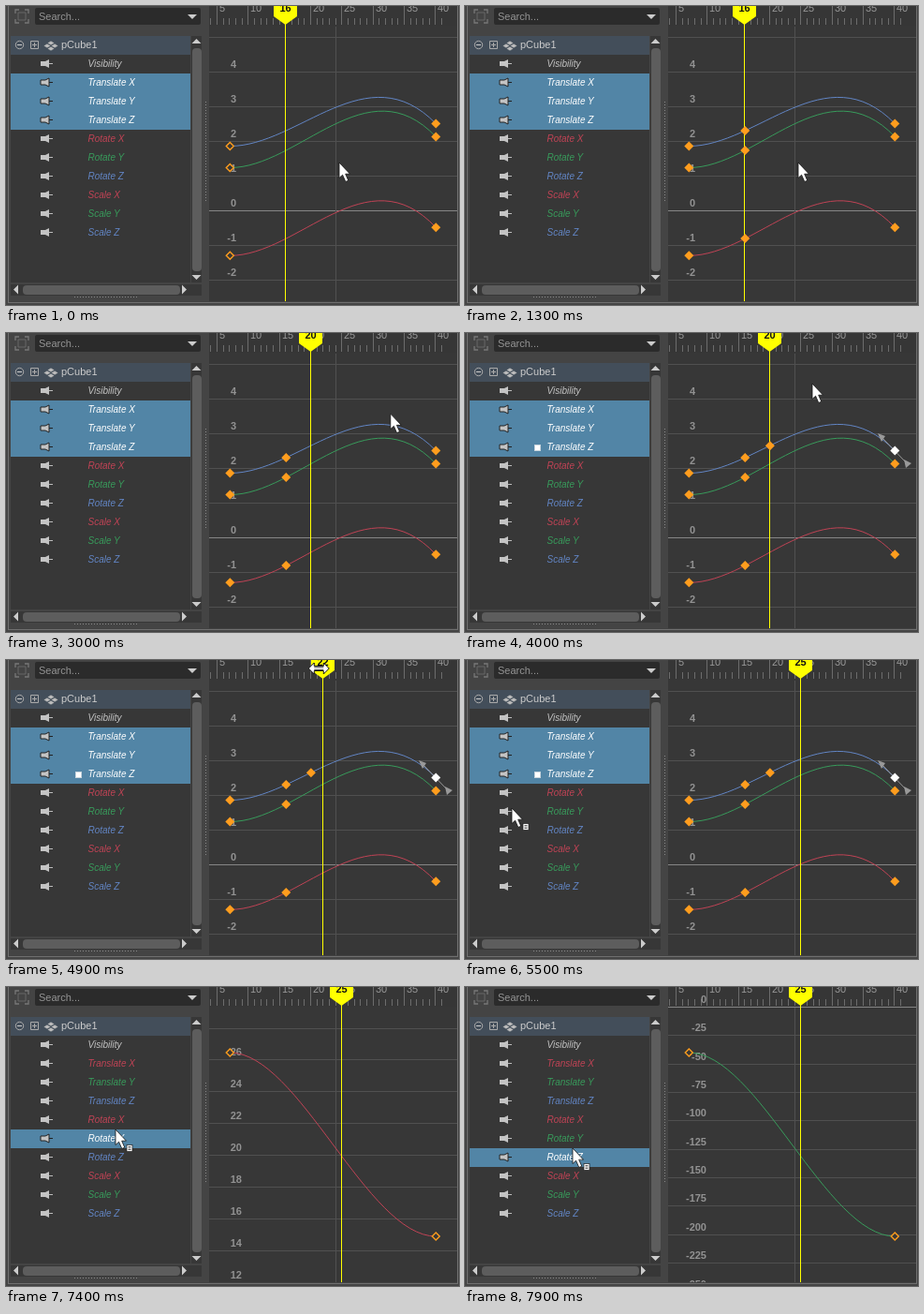
Animation of 484x319 px, one loop 8000 ms. Source, as an HTML page:

```html
<!DOCTYPE html>
<html lang="en">
<head>
<meta charset="utf-8">
<title>Graph editor</title>
<style>
  html, body { margin: 0; width: 100%; height: 100%; overflow: hidden; background: #444; }
  svg { display: block; font-family: "Liberation Sans", Arial, sans-serif; }
</style>
</head>
<body>
<svg id="stage" width="484" height="319" viewBox="0 0 484 319"></svg>
<script>
const LOOP = 8000, STEP = 100;
const RED = '#c04355', GREEN = '#389b5b', BLUE = '#6285c4', ORANGE = '#ff9d1e', YELLOW = '#ffff00';
const AXIS_COLORS = { X: RED, Y: GREEN, Z: BLUE };
const CHANNELS = ['Visibility', ...['Translate', 'Rotate', 'Scale'].flatMap(n => ['X', 'Y', 'Z'].map(a => n + ' ' + a))];
const START_X = 239.3, END_X = 459.3;

// Cursor moves: start time, number of steps, destination, cursor shape on arrival
const MOVES = [
  [1500, 5, 292, 9, 'resize'], [2200, 1, 296, 9, 'resize'], [2300, 4, 322, 9, 'resize'],
  [2800, 5, 459, 128, 'arrow'], [3500, 3, 371, 54, 'arrow'], [4300, 4, 326, 9, 'resize'],
  [4900, 3, 358, 9, 'resize'], [5300, 1, 270, 52, 'arrow'], [5400, 1, 140, 118, 'menu'],
  [5500, 1, 50, 158, 'menu'], [5600, 1, 24, 159, 'menu'], [5700, 1, 25, 155, 'menu'],
  [5800, 1, 68, 138, 'menu'], [5900, 1, 109, 127, 'menu'], [6100, 2, 115, 140, 'menu'],
  [7000, 2, 117, 152, 'menu'], [7600, 2, 115, 172, 'menu']
];

// Each curve: start height, second control height, end height, colour
const GRAPHS = {
  translate: {
    top: 33.3, gap: 37.05, first: 5, step: -1, count: 8, right: 246, skip: 1,
    curves: [[149.5, 50.5, 125.5, BLUE], [172.5, 62.5, 139.5, GREEN], [266.3, 157.8, 236.3, RED]]
  },
  rotateX: {
    top: 44, gap: 33.9, first: 28, step: -2, count: 9, right: 252, skip: 1,
    curves: [[70, 266, 266, RED]]
  },
  rotateY: {
    top: 21.2, gap: 30.4, first: 0, step: -25, count: 11, right: 258, skip: 0,
    curves: [[70, 266, 266, GREEN]]
  }
};

const rect = (x, y, w, h, fill, extra = '') => `<rect x="${x}" y="${y}" width="${w}" height="${h}" fill="${fill}" ${extra}/>`;
const path = (d, fill, stroke = 'none', width = 1) => `<path d="${d}" fill="${fill}" stroke="${stroke}" stroke-width="${width}"/>`;
const line = (x1, y1, x2, y2, stroke, extra = '') => `<path d="M${x1} ${y1}L${x2} ${y2}" stroke="${stroke}" ${extra}/>`;
const text = (x, y, s, fill, size = 11, extra = '') => `<text x="${x}" y="${y}" font-size="${size}" fill="${fill}" ${extra}>${s}</text>`;
const frameX = f => 192.2 + 6.665 * f;
const pixel = v => Math.floor(v) + 0.5;
const repeat = (n, draw) => Array.from({ length: n }, (_, i) => draw(i)).join('');

function cursorAt(t) {
  let x = 356, y = 167, kind = 'arrow';
  for (const [start, n, toX, toY, shape] of MOVES) {
    if (t < start) break;
    const k = Math.min(1, (Math.floor((t - start) / STEP) + 1) / n);
    const e = k * k * (3 - 2 * k);
    x += (toX - x) * e;
    y += (toY - y) * e;
    if (k === 1) kind = shape;
    else if (shape !== kind) kind = 'arrow';
    if (k < 1) break;
  }
  return { x, y, kind };
}

function playheadAt(t) {
  if (t < 2300) return 16;
  if (t < 4900) return Math.min(20, 17 + Math.floor((t - 2300) / STEP));
  return [22, 24, 25][Math.min(2, Math.floor((t - 4900) / STEP))];
}

function selectedRows(t) {
  if (t < 6400) return [1, 2, 3];
  return [t < 7400 ? 4 : t < 7900 ? 5 : 6];
}

function curveY([y0, y2, y3], x) {
  const u = (x - START_X) / (END_X - START_X), v = 1 - u;
  return y0 * (v ** 3 + 3 * v * v * u) + 3 * y2 * v * u * u + y3 * u ** 3;
}

function diamond(x, y, fill = ORANGE, hollow = false) {
  const r = hollow ? 4 : 5;
  return path(`M${x} ${y - r}l${r} ${r}l${-r} ${r}l${-r} ${-r}z`, hollow ? '#373737' : fill, hollow ? fill : 'none', 1.4);
}

function drawFrame() {
  const bracket = (x, y, sx, sy) => path(`M${x} ${y + 4 * sy}v${-4 * sy}h${4 * sx}`, 'none', '#777', 1.3);
  return rect(0, 0, 484, 319, '#444')
    + line(2.5, 0, 2.5, 316, '#707070') + line(2, 316.5, 482, 316.5, '#707070') + line(482.5, 0, 482.5, 317, '#707070')
    + bracket(10, 4, 1, 1) + bracket(24, 4, -1, 1) + bracket(10, 18, 1, -1) + bracket(24, 18, -1, -1)
    + path('M13 7h8v8h-8z', 'none', '#666')
    + rect(31, 2, 177, 18, '#2b2b2b', 'rx="2"') + text(35, 15, 'Search...', '#939393')
    + path('M194 9h10l-5 5z', '#ccc')
    + rect(5, 32, 192, 263, '#373737') + rect(198, 32, 11, 263, '#373737') + rect(5, 297, 204, 12, '#373737')
    + rect(199, 45, 10, 238, '#5d5d5d', 'rx="4"') + rect(18, 298, 168, 10, '#5d5d5d', 'rx="4"')
    + path('M198.5 40h10l-5-5zM198.5 287h10l-5 5zM13 297.5v10l-5-5zM188 297.5v10l5-5z', '#ccc')
    + line(73, 310.5, 140, 310.5, '#888', 'stroke-dasharray="1 2"')
    + line(213.5, 102, 213.5, 208, '#888', 'stroke-dasharray="1 2"');
}

function drawOutliner(t) {
  const chosen = selectedRows(t);
  const header = rect(5, 32, 192, 20, '#434e5a')
    + `<circle cx="14.5" cy="41.5" r="4.2" fill="none" stroke="#aaa"/>` + line(12, 41.5, 17, 41.5, '#ccc')
    + path('M26.5 37.5h8v8h-8zM28 41.5h5M30.5 39v5', 'none', '#aaa')
    + path('M48 37l4 2.5l-4 2.5l-4-2.5zM44 40l4 2.5l-4 2.5l-4-2.5zM52 40l4 2.5l-4 2.5l-4-2.5zM48 43l4 2.5l-4 2.5l-4-2.5z', '#bbb', '#434e5a', 0.7)
    + text(59, 45, 'pCube1', '#ccc');
  return header + CHANNELS.map((name, i) => {
    const y = 62 + 20 * i, on = chosen.includes(i);
    const color = on ? '#fff' : AXIS_COLORS[name.slice(-1)] || '#c4c4c4';
    const tagged = i === 3 && t >= 3400 && t < 6600;
    return (on ? rect(5, y - 10, 192, 20, '#5285a6') : '')
      + line(45, y - 0.5, 50, y - 0.5, on ? '#222' : '#bbb')
      + path(`M37 ${y - 3}h5l4-2v9l-4-2h-5z`, '#c4c4c4', on ? '#222' : 'none')
      + (tagged ? rect(74.5, y - 2.5, 6, 6, on ? '#fff' : '#5285c4', 'stroke="#c8d4dc"') : '')
      + text(87.5, y + 3, name, color, 10, 'font-style="italic"');
  }).join('');
}

function drawRuler() {
  return rect(217, 0, 265, 21, '#363636')
    + repeat(38, i => {
      const f = i + 4, x = pixel(frameX(f));
      if (x > 481) return '';
      const major = f % 5 === 0;
      return line(x, major ? 0 : 13, x, 20, '#6c6c6c') + (major ? text(x + 2.5, 6, f, '#999') : '');
    });
}

function drawKeys(t, curves, translate) {
  if (!translate) return curves.map(([y0, , y3]) => diamond(START_X, y0, ORANGE, true) + diamond(END_X, y3, ORANGE, true)).join('');
  const picked = t >= 3400;
  const handles = picked
    ? line(445, 111, 472, 139, '#999') + path('M441 107l8 3l-4 6zM477 139l-8-4l2 9z', '#999')
    : '';
  const added = (c, f) => diamond(frameX(f) + 0.4, curveY(c, frameX(f) + 0.4));
  return handles + curves.map((c, i) =>
    diamond(START_X, c[0], ORANGE, t < 1300)
    + (t >= 1300 ? added(c, 16) : '')
    + (t >= 4000 && i === 0 ? added(c, 20) : '')
    + diamond(END_X, c[2], picked && i === 0 ? '#fff' : ORANGE)).join('');
}

function drawGraph(t) {
  const name = t < 6600 ? 'translate' : t < 7500 ? 'rotateX' : 'rotateY';
  const g = GRAPHS[name], head = playheadAt(t), hx = pixel(frameX(head));
  const grid = repeat(g.count, i => {
    const y = pixel(g.top + i * g.gap), value = g.first + i * g.step;
    return y < 315 ? line(217, y, 482, y, value ? '#505050' : '#858585') : '';
  });
  const labels = repeat(g.count, i => i < g.skip ? '' :
    text(g.right, Math.floor(g.top + i * g.gap - 4), g.first + i * g.step, '#929292', 11, 'font-weight="bold" text-anchor="end"'));
  const third = (END_X - START_X) / 3;
  const curves = g.curves.map(([y0, y2, y3, color]) =>
    path(`M${START_X} ${y0}C${START_X + third} ${y0} ${END_X - third} ${y2} ${END_X} ${y3}`, 'none', color)).join('');
  return rect(217, 21, 265, 294, '#373737')
    + `<svg width="482" height="315">` + drawRuler() + grid + line(352.5, 22, 352.5, 315, '#505050')
    + labels + curves + line(hx, 0, hx, 315, YELLOW)
    + drawKeys(t, g.curves, name === 'translate') + '</svg>'
    + path(`M${hx - 12.5} 0h25v11l-12.5 9l-12.5-9z`, YELLOW)
    + text(hx, 6, head, '#111', 11, 'font-weight="bold" text-anchor="middle"');
}

function drawCursor(t) {
  const { x, y, kind } = cursorAt(t);
  const shape = kind === 'resize'
    ? path('M-11 0l6-6v3.5h10v-3.5l6 6l-6 6v-3.5h-10v3.5z', '#fff', '#111') + path('M-5 -1h10M-5 1.5h10', 'none', '#111', 0.8)
    : path('M0 0v16.5l3.6-3.3l3.2 7.3l3-1.3l-3.1-7h4.8z', '#fff', '#111', 0.8);
  const menu = kind === 'menu' ? rect(12, 16.5, 6, 7, '#fff', 'stroke="#222" stroke-width=".7"') + path('M13.5 18.8h3M13.5 21.2h3', 'none', '#222') : '';
  return `<g transform="translate(${x} ${y})">${shape}${menu}</g>`;
}

const stage = document.getElementById('stage');
const began = performance.now();
let shown = -1;

function tick() {
  const t = Math.floor(((performance.now() - began) % LOOP) / STEP) * STEP;
  if (t !== shown) {
    shown = t;
    stage.innerHTML = drawFrame() + drawOutliner(t) + drawGraph(t) + drawCursor(t);
  }
  requestAnimationFrame(tick);
}
tick();
</script>
</body>
</html>
```
